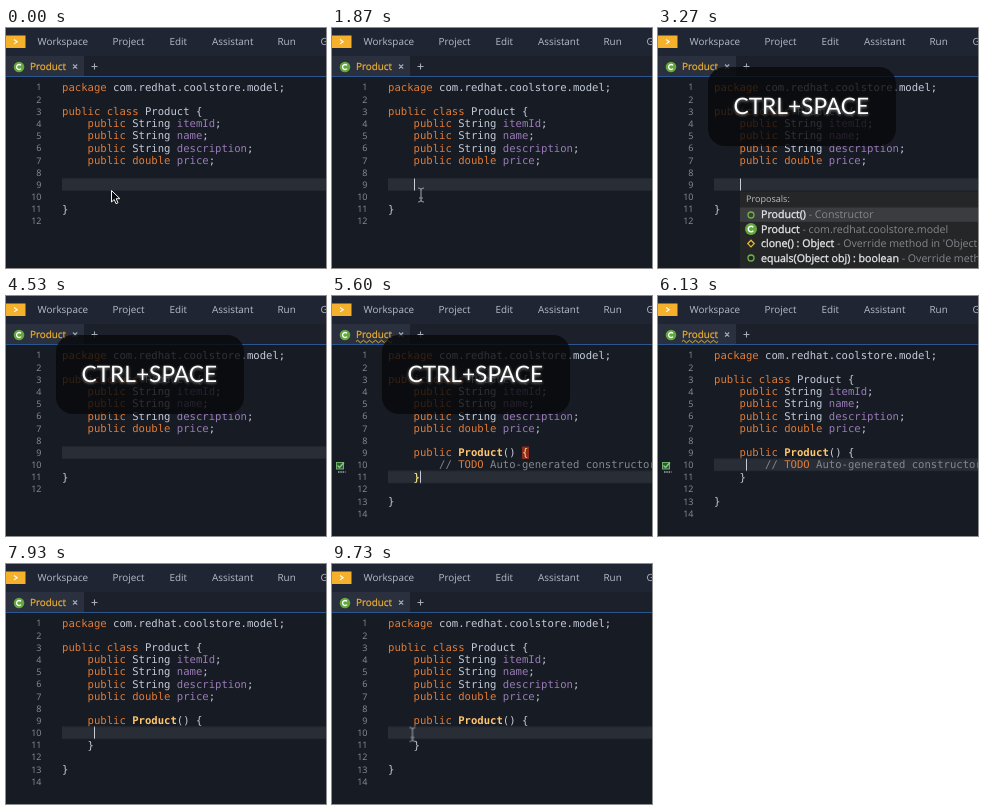
An HTML page that plays this animation: 320x240 px, repeating every 9.8 s.

```html
<!DOCTYPE html>
<html lang="en">
<head>
<meta charset="utf-8">
<title>Code completion demo</title>
<style>
html, body { margin: 0; width: 100%; height: 100%; overflow: hidden; background: #171b23; }
svg { display: block; width: 100vw; height: 100vh; }
text { white-space: pre; text-rendering: geometricPrecision; }

.ui { font: 9.9px "Open Sans", "Noto Sans", sans-serif; fill: #b6bdc9; }
.tab { fill: #efb132; stroke: #efb132; stroke-width: .2; }
.numbers { font: 9px "Open Sans", "Noto Sans", sans-serif; fill: #8a9099; text-anchor: end; }
.code { font: 10.6px "DejaVu Sans Mono", monospace; fill: #c3cbda; }
.list { font: 10.6px "Open Sans", "Noto Sans", sans-serif; fill: #e8e9eb; }
.name { stroke: #e8e9eb; stroke-width: .3; }
.head { font-size: 9.05px; fill: #b8bcc3; }
.keys { font: 22.7px Lato, sans-serif; fill: #fff; filter: drop-shadow(0 1px 1.5px #888); }
.k { fill: #e07c38; }
.f { fill: #9a7bb8; }
.m { fill: #ffc66d; font-weight: bold; }
.c { fill: #84878c; }
.dim { fill: #84878c; stroke: none; }
.hit { fill: #ffe06a; }

/* Percentages are of one 9800 ms loop */
.anim { animation: 9.8s step-end infinite; }
#before { animation-name: before; }
#after { animation-name: after; }
#band { animation-name: band; }
#selection { animation-name: selection; }
#comment { animation-name: comment; }
#marker { animation-name: marker; }
#squiggle { animation-name: squiggle; }
#brackets { animation-name: brackets; }
#caret { animation-name: caret; }
#popup { animation-name: popup; }
#keycap { animation-name: keycap; }
#arrow { animation-name: arrow; }
#ibeam { animation-name: ibeam; }

@keyframes before { 0% { opacity: 1 } 46.93%, 100% { opacity: 0 } }
@keyframes after { 0% { opacity: 0 } 46.93%, 100% { opacity: 1 } }
@keyframes band {
  0% { transform: none; opacity: 1 }
  46.93% { transform: translateY(24.4px); opacity: 1 }
  61.22% { transform: translateY(12.2px); opacity: 1 }
  66.63% { transform: translateY(12.2px); opacity: 0 }
  70.71%, 100% { transform: translateY(12.2px); opacity: 1 }
}
@keyframes selection { 0% { opacity: 0 } 66.63% { opacity: 1 } 70.71%, 100% { opacity: 0 } }
@keyframes comment { 0% { opacity: 1 } 70.71%, 100% { opacity: 0 } }
@keyframes marker { 0% { opacity: 0 } 56.42% { opacity: 1 } 70.71%, 100% { opacity: 0 } }
@keyframes squiggle { 0% { opacity: 0 } 56.42% { opacity: 1 } 80.91%, 100% { opacity: 0 } }
@keyframes brackets { 0% { opacity: 0 } 48.26% { opacity: 1 } 61.22%, 100% { opacity: 0 } }
@keyframes caret {
  0%, 14.28%, 24.48%, 34.69%, 44.89% { opacity: 0; transform: none }
  9.48%, 19.08%, 29.28%, 39.48% { opacity: 1; transform: none }
  46.93%, 56.42% { opacity: 1; transform: translate(6px, 24.4px) }
  51.73%, 61.22% { opacity: 0; transform: translate(6px, 24.4px) }
  61.93%, 70.71%, 80.91%, 91.12% { opacity: 1; transform: translate(6px, 12.2px) }
  66.63%, 76.22%, 86.42%, 96.63%, 100% { opacity: 0; transform: translate(6px, 12.2px) }
}
@keyframes popup { 0% { opacity: 0 } 32.65% { opacity: 1 } 45.6%, 100% { opacity: 0 } }
@keyframes keycap { 0% { opacity: 0 } 24.48% { opacity: 1 } 59.18%, 100% { opacity: 0 } }
@keyframes arrow {
  0% { transform: translate(105px, 162px); opacity: 1 }
  3.36% { transform: translate(105px, 162px); opacity: 1; animation-timing-function: steps(5, jump-both) }
  6.83% { transform: translate(85px, 158px); opacity: 1 }
  9.48% { transform: translate(88px, 163px); opacity: 1 }
  10.2%, 100% { transform: translate(88px, 163px); opacity: 0 }
}
@keyframes ibeam {
  0% { transform: translate(89px, 167px); opacity: 0 }
  10.2% { transform: translate(89px, 167px); opacity: 1 }
  32.65% { transform: translate(89px, 167px); opacity: 0 }
  99.28%, 100% { transform: translate(80.5px, 170.5px); opacity: 1 }
}
</style>
</head>
<body>
<svg viewBox="0 0 320 240" preserveAspectRatio="none">
  <defs>
    <g id="class-icon">
      <circle r="5.3" fill="#63a83c"/>
      <path d="M2-1.6A2.5 2.5 0 1 0 2 1.6" fill="none" stroke="#fff" stroke-width="1.3"/>
    </g>
    <circle id="ring" r="3" fill="none" stroke="#70b544" stroke-width="1.3"/>
  </defs>

  <rect width="320" height="240" fill="#171b23"/>
  <rect width="320" height="28" fill="#1f2532"/>
  <rect y="28" width="320" height="21" fill="#1b202a"/>
  <rect y="28" width="78" height="21" fill="#2a303e"/>
  <rect y="48" width="320" height="1" fill="#2c568f"/>

  <rect y="7.5" width="19.5" height="12.5" fill="#f5b02c"/>
  <path d="M8 11.5l3.2 2.2-3.2 2.2" fill="none" stroke="#fff" stroke-width="1.1"/>
  <g class="ui">
    <text x="31.5" y="17.3">Workspace</text>
    <text x="106.5" y="17.3">Project</text>
    <text x="163.5" y="17.3">Edit</text>
    <text x="206" y="17.3">Assistant</text>
    <text x="271.5" y="17.3">Run</text>
    <text x="314.5" y="17.3">Git</text>
    <text class="tab" x="24" y="42.3">Product</text>
  </g>
  <use href="#class-icon" x="13" y="39"/>
  <path d="M67 36.5l4.2 4.2m0-4.2l-4.2 4.2M85.5 38.5h6m-3-3v6" fill="none" stroke="#a5acb8" stroke-width="1.1"/>
  <path id="squiggle" class="anim" d="M24 45.5q1.5-2.5 3 0t3 0 3 0 3 0 3 0 3 0 3 0 3 0 3 0 3 0 3 0 3 0" fill="none" stroke="#e3b82d"/>

  <rect id="band" class="anim" x="56" y="150.3" width="264" height="12.4" fill="#292d35"/>
  <rect id="selection" class="anim" x="88" y="162.5" width="232" height="12.4" fill="#256c9f"/>

  <text class="numbers" y="50.1"><tspan x="35.5" dy="12.2">1</tspan><tspan x="35.5" dy="12.2">2</tspan><tspan x="35.5" dy="12.2">3</tspan><tspan x="35.5" dy="12.2">4</tspan><tspan x="35.5" dy="12.2">5</tspan><tspan x="35.5" dy="12.2">6</tspan><tspan x="35.5" dy="12.2">7</tspan><tspan x="35.5" dy="12.2">8</tspan><tspan x="35.5" dy="12.2">9</tspan><tspan x="35.5" dy="12.2">10</tspan><tspan x="35.5" dy="12.2">11</tspan><tspan x="35.5" dy="12.2">12</tspan></text>

  <g class="code">
    <text x="56" y="62.5"><tspan class="k">package</tspan> com.redhat.coolstore.model;</text>
    <text x="56" y="86.9"><tspan class="k">public class</tspan> Product {</text>
    <text x="81.5" y="99.1"><tspan class="k">public</tspan> String <tspan class="f">itemId</tspan>;</text>
    <text x="81.5" y="111.3"><tspan class="k">public</tspan> String <tspan class="f">name</tspan>;</text>
    <text x="81.5" y="123.5"><tspan class="k">public</tspan> String <tspan class="f">description</tspan>;</text>
    <text x="81.5" y="135.7"><tspan class="k">public double</tspan> <tspan class="f">price</tspan>;</text>
    <text id="before" class="anim" x="56" y="184.5">}</text>
    <g id="after" class="anim">
      <text x="81.5" y="160.1"><tspan class="k">public</tspan> <tspan class="m">Product</tspan>() {</text>
      <text id="comment" class="anim c" x="107" y="172.3">// <tspan class="k">TODO</tspan> Auto-generated constructor stub</text>
      <text x="81.5" y="184.5">}</text>
      <text x="56" y="208.9">}</text>
      <g class="numbers">
        <text x="35.5" y="208.9">13</text>
        <text x="35.5" y="221.1">14</text>
      </g>
    </g>
    <g id="brackets" class="anim">
      <rect x="190" y="150.5" width="7" height="12.5" fill="#8e2a20"/>
      <text class="hit" x="189.9" y="160.1">{</text>
      <text class="hit" x="81.5" y="184.5">}</text>
    </g>
  </g>

  <g id="marker" class="anim">
    <rect x="4.5" y="166.5" width="7" height="6.5" fill="#38523c" stroke="#6fae68"/>
    <path d="M5.5 169.5l2 2 4.5-5" fill="none" stroke="#7bd07a" stroke-width="1.4"/>
    <path d="M6 176h7.5" stroke="#7d858f" stroke-width="2" stroke-dasharray="1.5 .8"/>
  </g>

  <rect id="caret" class="anim" x="82" y="150.5" width="1" height="12" fill="#c9ccd2"/>

  <g id="arrow" class="anim">
    <path d="M.5.5v11.5l2.7-2.5 1.8 4.2 2-.9-1.8-4.1h3.7z" fill="#0b0c0f" stroke="#f2f2f2" stroke-width="1"/>
  </g>
  <g id="ibeam" class="anim">
    <path d="M-3-7q3 0 3 2.5q0-2.5 3-2.5M0-5V5M-3 7q3 0 3-2.5q0 2.5 3 2.5M-2 3h4" fill="none" stroke="#8d929a" stroke-width="1.2"/>
  </g>

  <g id="popup" class="anim list">
    <rect x="82" y="163.5" width="238" height="76.5" fill="#252628"/>
    <rect x="82" y="179.5" width="238" height="14.3" fill="#3a3c3f"/>
    <text class="head" x="88" y="173.5">Proposals:</text>
    <use href="#ring" x="93" y="187"/>
    <use href="#class-icon" transform="translate(93 201) scale(1.13)"/>
    <path d="M93 212.3l3.2 3.3-3.2 3.3-3.2-3.3z" fill="none" stroke="#e5b93c" stroke-width="1.3"/>
    <use href="#ring" x="93" y="230"/>
    <g class="name">
      <text x="103" y="190.3">Product()<tspan class="dim"> - Constructor</tspan></text>
      <text x="103" y="204.8">Product<tspan class="dim"> - com.redhat.coolstore.model</tspan></text>
      <text x="103" y="219.3">clone() : Object<tspan class="dim"> - Override method in 'Object'</tspan></text>
      <text x="103" y="233.8">equals(Object obj) : boolean<tspan class="dim"> - Override method in 'Object'</tspan></text>
    </g>
  </g>

  <g id="keycap" class="anim">
    <rect x="50" y="39" width="188" height="79" rx="17" fill="#08090b" fill-opacity=".8"/>
    <text class="keys" x="75.5" y="86">CTRL+SPACE</text>
  </g>
</svg>
</body>
</html>
```
